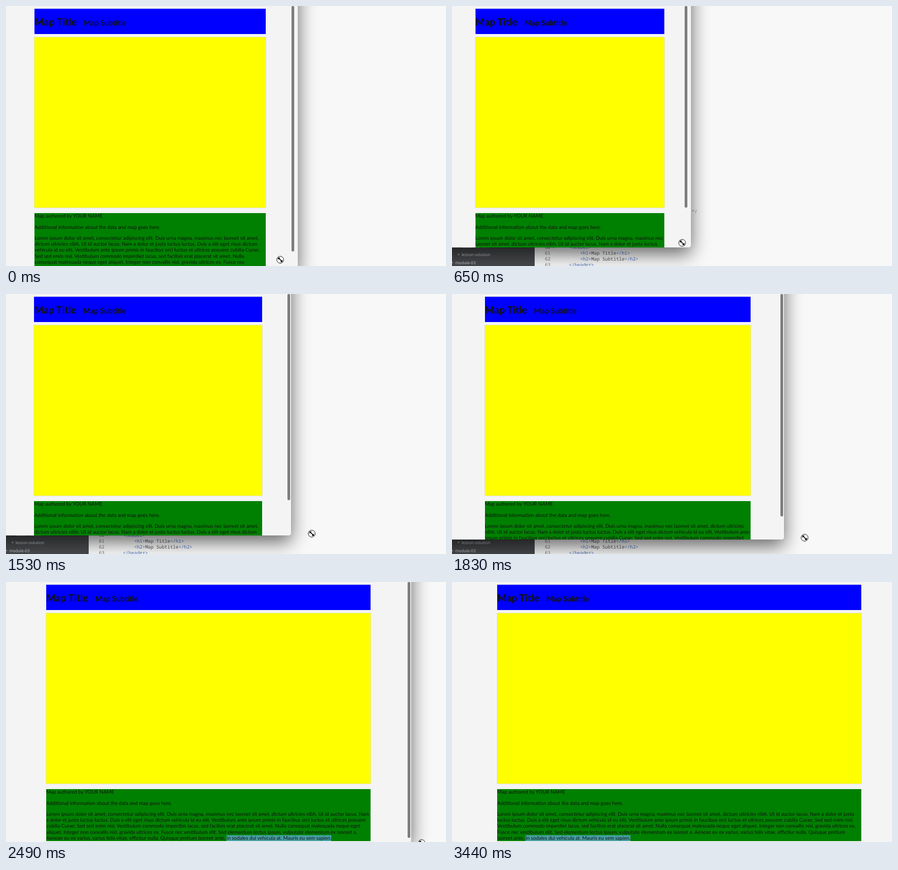
Recreate the animation shown at these times as an HTML page. Size 974 by 575 pixels, loop 4.01 s.

```html
<!DOCTYPE html>
<html lang="en">
<head>
<meta charset="utf-8">
<title>Resizing a responsive page</title>
<style>
html, body { margin: 0; width: 100%; height: 100%; overflow: hidden; }
body { position: relative; background: #f8f8f8; text-rendering: geometricPrecision; }
body div, #cursor { position: absolute; }

/* editor behind the browser window */
#side { left: 0; top: 0; width: 183px; height: 100%; background: #47494c; color: #d0d2d4; font: 9px/18px "Open Sans", sans-serif; }
#side div { white-space: pre; }
#side i { font: 6px/18px "DejaVu Sans", sans-serif; position: absolute; left: -8px; color: #929496; }
#side span { color: #929496; }
.code { font: 10.24px/13px "Noto Sans Mono", monospace; white-space: pre; color: #535353; }
.code b { font-weight: 400; color: #446fbd; }
.code i { font-style: normal; color: #8a8a8a; }
.num { width: 30px; left: 188px; text-align: right; color: #767676; }

/* browser window */
#win { left: -60px; top: -120px; border-radius: 0 0 5px 5px; box-shadow: 0 0 1px rgba(0,0,0,.5), 0 14px 40px rgba(0,0,0,.6); }
#view { left: 0; top: 0; overflow: hidden; background: #f4f4f4; border-radius: 0 0 5px 0; color: #111; font-family: Lato, sans-serif; }
#page { top: 0; }
#page > * { position: absolute; left: 0; width: 100%; }
header { top: 6px; height: 56px; background: #00f; display: flex; align-items: baseline; gap: 15.6px; padding-top: 16px; box-sizing: border-box; white-space: nowrap; line-height: 1.185; }
h1, h2, p { margin: 0; }
h1 { font-size: 2em; }
h2 { font-size: 1.5em; }
#map { top: 69px; height: 377px; background: #ff0; box-shadow: 0 0 0 1px #ddd; }
footer { top: 458px; background: green; line-height: 13.2px; }
p + p { margin-top: 11.3px; }
mark { background: #459fa2; color: inherit; }
#thumb { top: 0; width: 6px; border-radius: 3px; background: #7d7d7d; }
</style>
</head>
<body>
<div id="side">
  <div style="left:21px;top:523px">lesson-02<span>.md</span></div>
  <div style="left:21px;top:541px"><i>▶</i>lesson-solution</div>
  <div style="left:7px;top:559px"><i>▶</i>module-03</div>
</div>
<div class="code" style="left:500px;top:449px"><i>HERE */</i></div>
<div class="code num" style="top:528px">60
61
62
63</div>
<div class="code" style="left:222px;top:528px;font-size:8px;color:#bbb">▼</div>
<div class="code" style="left:259px;top:528px"><b>&lt;header&gt;</b>
    <b>&lt;h1&gt;</b>Map Title<b>&lt;/h1&gt;</b>
    <b>&lt;h2&gt;</b>Map Subtitle<b>&lt;/h2&gt;</b>
<b>&lt;/header&gt;</b></div>

<div id="win"></div>
<div id="view">
  <div id="page">
    <header><h1>Map Title</h1><h2>Map Subtitle</h2></header>
    <section id="map"></section>
    <footer>
      <p>Map authored by YOUR NAME</p>
      <p>Additional information about the data and map goes here.</p>
      <p>Lorem ipsum dolor sit amet, consectetur adipiscing elit. Duis urna magna, maximus nec laoreet sit amet, dictum ultricies nibh. Ut id auctor lacus. Nam a dolor et justo luctus luctus. Duis a elit eget risus dictum vehicula id eu elit. Vestibulum ante ipsum primis in faucibus orci luctus et ultrices posuere cubilia Curae; Sed sed enim nisl. Vestibulum commodo imperdiet lacus, sed facilisis erat placerat sit amet. Nulla consequat malesuada neque eget aliquet. Integer non convallis nisl, gravida ultrices ex. Fusce nec vestibulum elit. Sed elementum lectus ipsum, vulputate elementum ex laoreet a. Aenean eu ex varius, varius felis vitae, efficitur nulla. Quisque pretium laoreet ante, <mark>in sodales dui vehicula at. Mauris eu sem sapien.</mark></p>
    </footer>
  </div>
  <div id="thumb"></div>
</div>
<svg id="cursor" width="18" height="18" viewBox="-9 -9 18 18" style="left:0;top:0">
  <circle r="7.7" fill="#fff" stroke="#000"/>
  <path d="M-3 -3L3 3" stroke="#000" stroke-width="1.8"/>
  <path d="M-5 -5h5.2l-5.2 5.2zM5 5h-5.2l5.2 -5.2z"/>
</svg>

<script>
const $ = id => document.getElementById(id);
const win = $('win'), view = $('view'), page = $('page'), thumb = $('thumb'), cursor = $('cursor');
const footer = document.querySelector('footer');
const LOOP = 4010, LEAD = 130;

// the screen refreshes at an even pace within each span: start, end, steps
const spans = [[0, 347, 2], [347, 2117, 12], [2117, 3440, 8]];

function lastTick(t) {
  const [from, to, steps] = spans.findLast(s => s[0] <= t);
  const gap = (to - from) / steps;
  return from + gap * Math.min(steps, Math.floor((t - from) / gap));
}

// path of the dragged corner: time, page width, window bottom
const path = [
  [0, 640, 583], [347, 552, 546], [642, 522.5, 534], [937, 493, 529], [1084.5, 498.5, 529],
  [1232, 529, 531], [1527, 631, 534], [2117, 838.6, 552], [2779, 955.5, 600], [3440, 1008, 660]
];

function corner(t) {
  const i = Math.min(path.length - 2, path.findLastIndex(k => k[0] <= t));
  const a = path[i], b = path[i + 1];
  const f = (t - a[0]) / (b[0] - a[0]);
  return [1, 2].map(n => a[n] + (b[n] - a[n]) * f);
}

// page zoom, taken from one full line of body copy
const ctx = document.createElement('canvas').getContext('2d');
ctx.font = '100px Lato, sans-serif';
ctx.textRendering = 'geometricPrecision';
const line = 'lacus. Nam a dolor et justo luctus luctus. Duis a elit eget risus dictum vehicula id eu elit. ' +
  'Vestibulum ante ipsum primis in faucibus orci luctus';
view.style.fontSize = 100 * 670.6 / ctx.measureText(line).width + 'px';

function draw(now) {
  const t = lastTick(now % LOOP);
  const [width, bottom] = corner(t);
  const [x, y] = corner(t + LEAD);
  // while shrinking, the frame trails the page inside it
  const right = width + (x < width ? 6 : 0);
  win.style.width = right + 60 + 'px';
  win.style.height = bottom + 120 + 'px';
  view.style.width = right + 'px';
  view.style.height = bottom + 'px';
  page.style.left = width * .1 - .7 + 'px';
  page.style.width = width * .8 + 'px';
  const total = 458 + footer.offsetHeight + 13;
  thumb.style.left = width - 8 + 'px';
  thumb.style.height = bottom * bottom / total + 'px';
  thumb.hidden = bottom >= total;
  cursor.style.transform = `translate(${x - 9}px, ${y - 17}px)`;
}

const start = performance.now();
function loop() {
  draw(performance.now() - start);
  requestAnimationFrame(loop);
}
loop();
</script>
</body>
</html>
```
